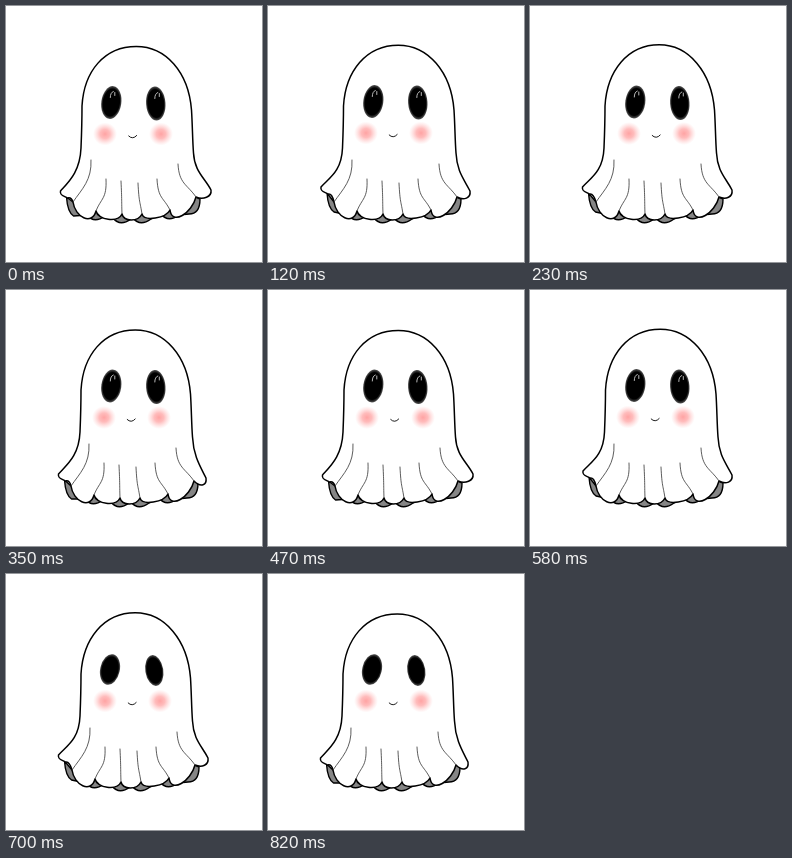
Recreate the animation shown at these times as an HTML page. Size 256 by 256 pixels, loop 0.93 s.

```html
<!DOCTYPE html>
<html lang="en">
<head>
<meta charset="utf-8">
<title>Ghost</title>
<style>
html, body { margin: 0; width: 100%; height: 100%; overflow: hidden; background: #fff; }
#strip {
  display: block; width: 800vw; height: 100vh;
  animation: flip 930ms step-end infinite;
}
/* Eight held drawings, alternating 120 and 110 ms. */
@keyframes flip {
  0% { transform: translateX(0); }
  12.903% { transform: translateX(-100vw); }
  24.731% { transform: translateX(-200vw); }
  37.634% { transform: translateX(-300vw); }
  50.538% { transform: translateX(-400vw); }
  62.366% { transform: translateX(-500vw); }
  75.269% { transform: translateX(-600vw); }
  88.172%, 100% { transform: translateX(-700vw); }
}
path { stroke: #000; stroke-linecap: round; stroke-linejoin: round; }
.body { fill: #fff; stroke-width: 1.5; }
.under { fill: #858585; stroke-width: 1.4; }
.fold { fill: none; stroke: #333; stroke-width: .8; }
.mouth { fill: none; stroke-width: .9; }
.glint { fill: none; stroke: #ccc; stroke-width: .9; }
</style>
</head>
<body>
<svg id="strip" viewBox="0 0 2048 256" preserveAspectRatio="none">
  <defs>
    <radialGradient id="blush">
      <stop offset="0" stop-color="#ffa3a3"/>
      <stop offset=".4" stop-color="#ffb0b0" stop-opacity=".85"/>
      <stop offset="1" stop-color="#ffcaca" stop-opacity="0"/>
    </radialGradient>
    <radialGradient id="eye">
      <stop offset=".82" stop-color="#000"/>
      <stop offset="1" stop-color="#555"/>
    </radialGradient>
  </defs>
</svg>
<script>
// Each fold runs from its top to a notch in the hem: x, y, hem x, hem y.
const folds = [
  [85, 154, 67, 196], [100, 173, 90, 205], [115, 175, 116, 208],
  [132, 177, 136, 208], [151, 173, 164, 204], [172, 158, 190, 191]
];
const sag = [15, 9, 8, 8, 16];

// Redrawn cloth: head top, side edges, tips and sideways drift of the folds.
const cloth = [
  { top: 40.5, left: 76, right: 185.5, tipL: [54.5, 185], tipR: [205, 184], drift: 0 },
  { top: 39.2, left: 75.5, right: 186, tipL: [53, 181], tipR: [202, 185], drift: -1 },
  { top: 38.8, left: 75, right: 184.5, tipL: [52.5, 181], tipR: [202, 184], drift: -1 },
  { top: 40, left: 75, right: 184.5, tipL: [52.5, 184], tipR: [200, 188], drift: -2 }
];

// Face: blush x left and right, blush y, and whether the eyes shine.
const faces = [
  [99, 155, 128, true], [98, 153, 127, true], [99, 154, 127.5, true], [98, 153, 127.5, true],
  [99, 155, 127.5, true], [98, 153, 127, true], [99, 154, 127, false], [98, 153, 127, false]
];

const path = (cls, d) => `<path class="${cls}" d="${d}"/>`;

const ellipse = (x, y, rx, ry, fill, tilt = 0) =>
  `<ellipse cx="${x}" cy="${y}" rx="${rx}" ry="${ry}" fill="url(#${fill})" transform="rotate(${tilt} ${x} ${y})"/>`;

function drawCloth({ top, left, right, tipL: [lx, ly], tipR: [rx, ry], drift }) {
  const mid = (left + right) / 2 - .5, half = (right - left) / 2;
  const creases = folds.map(([x, y, hx, hy]) => [x + drift, y, hx + drift, hy]);
  const hem = creases.map(crease => crease.slice(2));
  const [firstX, firstY] = hem[0], [lastX, lastY] = hem[5];

  // The inside of the cloth shows as a small flap below each notch.
  const flaps = hem.slice(1, 5).map(([x, y]) =>
    `L${x - 9} ${y + 4} Q${x - 2} ${y + 13} ${x + 9} ${y + 5}`).join(" ");
  const under = `M${lx + 6} ${ly + 6} Q${lx + 7} ${ly + 21} ${lx + 13} ${ly + 25}` +
    ` ${flaps} L${lastX - 7} 208 Q${lastX + 4} 208 ${lastX + 4} ${lastY + 2}` +
    ` L${lastX} ${lastY} L${firstX} ${firstY} Z`;

  const lobes = hem.slice(1).map(([x, y], i) =>
    `C${hem[i][0] + 2} ${hem[i][1] + sag[i]} ${x - 4} ${y + sag[i]} ${x} ${y}`).join(" ");

  const body = `M${firstX} ${firstY} ${lobes}` +
    ` C${lastX + 7} ${ry + 10} ${rx + 1} ${ry + 7} ${rx} ${ry}` +
    ` C${rx - 6} ${ry - 12} ${right + 3} 166 ${right + 2} 147` +
    ` C${right + 1} 134 ${right + 1} 120 ${right} 104` +
    ` C${right - 3} 66 ${mid + half * .54} ${top} ${mid} ${top}` +
    ` C${mid - half * .58} ${top} ${left + 2} 65 ${left} 100` +
    ` C${left} 116 ${left - .5} 130 ${left - 1} 142` +
    ` C${left - 2} 166 ${lx + 8} ${ly - 9} ${lx} ${ly}` +
    ` C${lx - 1} ${ly + 5} ${lx + 4} ${ly + 5} ${lx + 7} ${ly + 7}` +
    ` Q${lx + 11} ${ly + 6} ${firstX} ${firstY} Z`;

  const lines = creases.map(([x, y, hx, hy]) =>
    path("fold", `M${x} ${y} C${x + 1} ${y + 20} ${(x + hx) / 2} ${hy - 13} ${hx} ${hy}`));

  return path("under", under) + path("body", body) + lines.join("");
}

function drawFace([blushL, blushR, y, shine]) {
  const eye = (x, y, rx, ry, tilt) => ellipse(x, y, rx, ry, "eye", tilt) +
    (shine ? path("glint", `M${x - 1} ${y - 5} q0 -5 3 -6 M${x + 3.5} ${y - 7} v-3`) : "");
  const eyes = shine
    ? eye(105.3, y - 31.5, 10, 16.5, 8) + eye(149.8, y - 30.5, 9.7, 17, -4)
    : eye(104, y - 31.5, 9.8, 15.5, 12) + eye(148.3, y - 30.5, 9, 15.5, -9);
  const mouthX = (blushL + blushR) / 2 - .3;
  return eyes + ellipse(blushL, y, 12, 11.5, "blush") + ellipse(blushR, y, 12, 11.5, "blush") +
    path("mouth", `M${mouthX - 4} ${y + 2} q4 4 8 -.5`);
}

document.getElementById("strip").insertAdjacentHTML("beforeend", faces.map((face, i) =>
  `<svg x="${i * 256}" width="256" height="256">${drawCloth(cloth[i % 4])}${drawFace(face)}</svg>`
).join(""));
</script>
</body>
</html>
```
